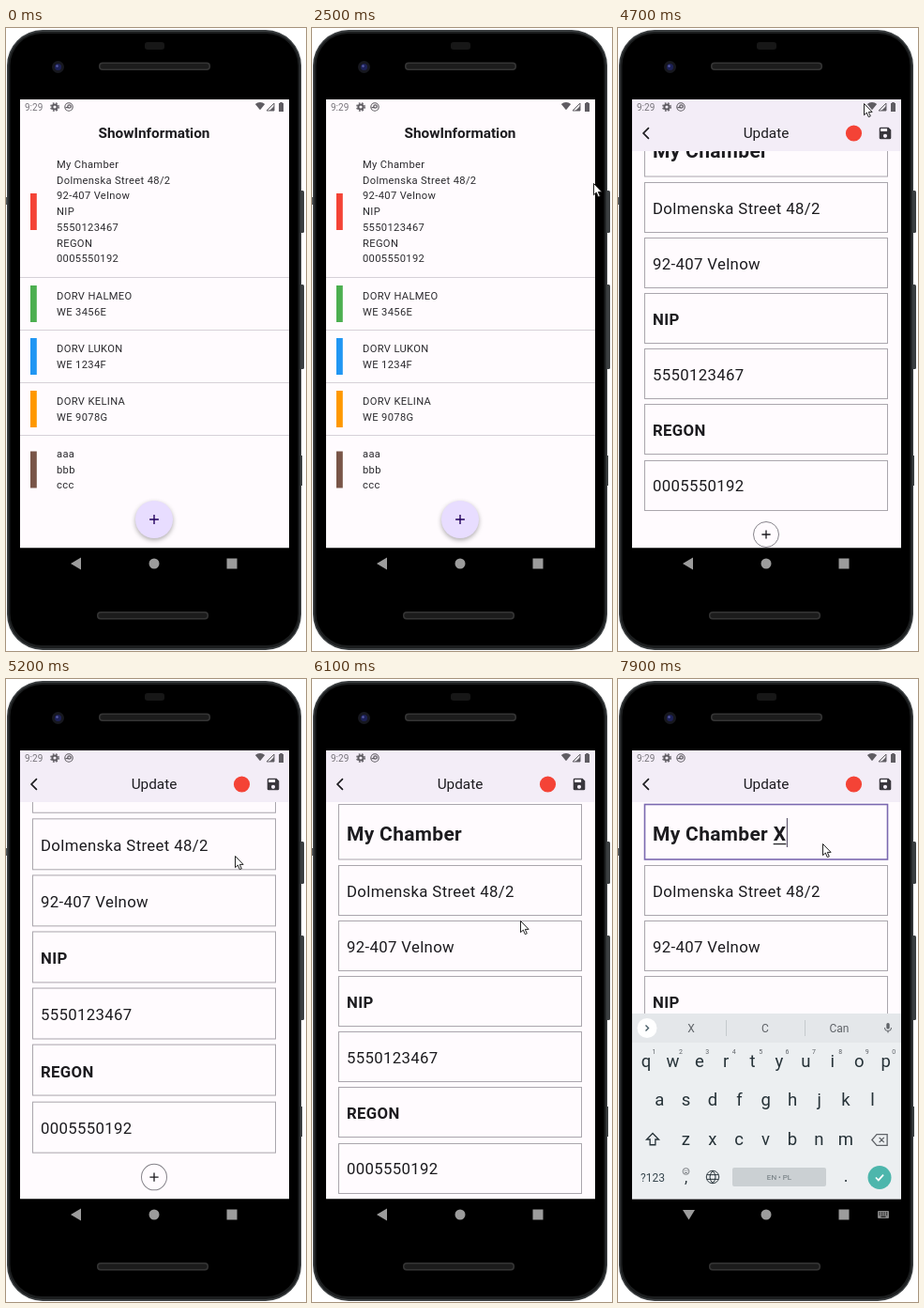
Write an HTML page with a canvas that moves like this. It is 320 px wide and 663 px high and loops after 8000 ms.

```html
<!DOCTYPE html>
<html lang="en">
<head>
<meta charset="utf-8">
<title>ShowInformation</title>
<style>
  html, body { margin: 0; width: 100%; height: 100%; overflow: hidden; background: #fff; }
  canvas { display: block; width: 320px; height: 663px; }
</style>
</head>
<body>
<canvas id="stage"></canvas>
<script>
const canvas = document.getElementById('stage');
const ctx = canvas.getContext('2d');
const LOOP = 8000, STEP = 100;
const DP = 0.698;
const SCREEN = { x: 15, y: 76, w: 287, h: 477.5 };
const BG = '#fffbfe', TINT = '#f3edf7', INK = '#1c1b1f', LILAC = '#e8ddff', DEEP = '#21005d';

const COMPANY = 'My Chamber';
const DETAILS = ['Dolmenska Street 48/2', '92-407 Velnow', 'NIP', '5550123467', 'REGON', '0005550192'];
const ROWS = [
  { lines: [COMPANY, ...DETAILS], y: 145, bar: 176, color: '#f44336' },
  { lines: ['DORV HALMEO', 'WE 3456E'], y: 285, bar: 274, color: '#4caf50' },
  { lines: ['DORV LUKON', 'WE 1234F'], y: 341, bar: 330, color: '#2196f3' },
  { lines: ['DORV KELINA', 'WE 9078G'], y: 397, bar: 386, color: '#ff9800' },
  { lines: ['aaa', 'bbb', 'ccc'], y: 453, bar: 450.5, color: '#795548' }
];

const ICONS = {
  plus: 'M19 13h-6v6h-2v-6H5v-2h6V5h2v6h6z',
  pencil: 'M3 17.25V21h3.75L17.81 9.94l-3.75-3.75zM20.71 7.04a1 1 0 0 0 0-1.41l-2.34-2.34a1 1 0 0 0-1.41 0l-1.83 1.83 3.75 3.75z',
  save: 'M17 3H5a2 2 0 0 0-2 2v14a2 2 0 0 0 2 2h14a2 2 0 0 0 2-2V7zM12 19a3 3 0 1 1 0-6 3 3 0 0 1 0 6zM15 9H5V5h10z',
  wifi: 'M12 21L0 6a18 18 0 0 1 24 0z',
  signal: 'M3 21h18V3z',
  mic: 'M12 14a3 3 0 0 0 3-3V5a3 3 0 0 0-6 0v6a3 3 0 0 0 3 3zM17.3 11a5.3 5.3 0 0 1-10.6 0H5a7 7 0 0 0 6 6.9V21h2v-3.1a7 7 0 0 0 6-6.9z',
  shift: 'M12 3L3 12h5v8h8v-8h5z',
  erase: 'M8 4h15v16H8l-7-8zM11.5 8.5l7 7M18.5 8.5l-7 7',
  globe: 'M12 2a10 10 0 1 0 .01 0zM12 2q-9 10 0 20q9-10 0-20M3 8.5h18M3 15.5h18',
  check: 'M5 12l5 5L19 7',
  chevron: 'M9 6l6 6-6 6',
  back: 'M17 2L7 12l10 10',
  arrow: 'M0.5 0.5v12.2l2.8-2.6 2 4.6 2-.9-2-4.4h3.8z'
};
for (const name in ICONS) ICONS[name] = new Path2D(ICONS[name]);

// Piecewise-linear value of [time, value] keys; values are numbers or points.
function track(keys, t) {
  if (t <= keys[0][0]) return keys[0][1];
  for (let i = 1; i < keys.length; i++) {
    const [t0, a] = keys[i - 1], [t1, b] = keys[i];
    if (t > t1) continue;
    const k = (t - t0) / (t1 - t0);
    return Array.isArray(a) ? a.map((v, j) => v + (b[j] - v) * k) : a + (b - a) * k;
  }
  return keys[keys.length - 1][1];
}

const POINTER_LEFT = [
  [100, [188, 39]], [300, [30, 190]], [500, [18, 300]], [700, [20, 460]], [900, [110, 554]],
  [1000, [148, 510]], [1200, [20, 440]], [1400, [17, 176]], [1600, [18, 350]], [1700, [19, 475]],
  [1800, [19, 475]], [1900, [22, 190]]
];
const POINTER_RIGHT = [
  [2500, [300, 165]], [2600, [272, 172]], [2800, [234, 180]], [3000, [234, 180]], [3400, [165, 184]],
  [3600, [180, 188]], [3800, [262, 192]], [4000, [270, 195]], [4500, [270, 195]], [4800, [258, 22]],
  [5000, [248, 215]], [5200, [244, 188]], [5300, [243, 178]], [5500, [239, 231]], [5600, [238.5, 231]],
  [5700, [238, 233]], [6000, [230, 273]], [6300, [205, 225]], [6600, [180, 163]], [6900, [180, 163]],
  [7500, [212, 170]], [7700, [218, 175]]
];
const SWIPE = [[3000, 0], [3100, -10], [3300, -45], [3400, -57.4]];
const SCROLL = [[4500, 0], [4600, 14], [4700, 34], [4800, 42.5], [5600, 42.5], [5700, 40], [5900, 13], [6000, 0]];
const STRETCH = [[4700, 1], [4800, 1.03], [5000, 1], [5200, 1.018], [5300, 1.022], [5500, 1]];
const KEYBOARD = [[6900, 0], [7000, 0.55], [7100, 0.88], [7200, 1]];

function box(x, y, w, h, color) { ctx.fillStyle = color; ctx.fillRect(x, y, w, h); }
function pill(x, y, w, h, r, color) {
  ctx.fillStyle = color;
  ctx.beginPath(); ctx.roundRect(x, y, w, h, r); ctx.fill();
}
function disc(x, y, r, color) {
  ctx.fillStyle = color;
  ctx.beginPath(); ctx.arc(x, y, r, 0, 7); ctx.fill();
}
function ring(x, y, r, color, width = 1) {
  ctx.strokeStyle = color; ctx.lineWidth = width;
  ctx.beginPath(); ctx.arc(x, y, r, 0, 7); ctx.stroke();
}
function poly(points, color) {
  ctx.fillStyle = color;
  ctx.beginPath(); points.forEach(p => ctx.lineTo(...p)); ctx.fill();
}
// y is the middle of the capitals.
function text(str, x, y, size, { color = INK, weight = 400, align = 'left', spacing = 0 } = {}) {
  ctx.font = `${weight} ${size}px Roboto, sans-serif`;
  ctx.letterSpacing = spacing + 'px';
  ctx.textAlign = align;
  ctx.fillStyle = color;
  ctx.fillText(str, x, y + size * 0.355);
  return ctx.measureText(str).width;
}
function icon(name, cx, cy, color, scale = DP, stroke = 0) {
  ctx.save();
  ctx.translate(cx - 12 * scale, cy - 12 * scale);
  ctx.scale(scale, scale);
  ctx.fillStyle = ctx.strokeStyle = color;
  ctx.lineWidth = stroke / scale;
  stroke ? ctx.stroke(ICONS[name]) : ctx.fill(ICONS[name], 'evenodd');
  ctx.restore();
}
function clipped(x, y, w, h, draw) {
  ctx.save();
  ctx.beginPath(); ctx.rect(x, y, w, h); ctx.clip();
  draw();
  ctx.restore();
}

function phone() {
  box(0, 0, 320, 663, '#fff');
  box(0, 180, 3, 8, '#55595b');
  pill(313, 173, 5, 45, 1.5, '#3a3e40');
  pill(313, 273, 5, 90, 1.5, '#3a3e40');
  box(313, 455, 3, 32, '#3a3e40');
  pill(1, 2, 314, 660, 38, '#3a3e40');
  pill(2.5, 4, 311, 656, 36, '#1b1d1e');
  pill(4.5, 6, 307, 651, 34, '#000');
  pill(148, 15, 21, 8, 3, '#171717');
  for (const [x, y] of [[99, 36.5], [97, 621]]) {
    pill(x, y, 119, 8.5, 4, '#353535');
    pill(x + 1.5, y + 1.5, 116, 5.5, 3, '#1c1c1c');
  }
  disc(55.5, 41.5, 6.5, '#17181f');
  disc(55.5, 41.5, 3.5, '#1d2157');
  disc(54.5, 40.5, 1.2, '#5a5fa8');
}

function navBar(typing) {
  const grey = '#9c9c9c';
  poly(typing ? [[69, 565], [82, 565], [75.5, 575.5]] : [[69, 570], [80, 563.5], [80, 576.5]], grey);
  disc(158, 570, 5.5, grey);
  box(235.5, 564.5, 11, 11, grey);
  if (!typing) return;
  pill(277, 566, 12, 8, 1, '#858585');
  for (let i = 0; i < 8; i++) box(278.5 + (i % 4) * 2.5, 567.5 + (i >> 2) * 2, 1.2, 1, '#000');
  box(280.5, 571.7, 5, 1, '#000');
}

function statusBar() {
  const grey = '#5f5c62';
  text('9:29', 20, 84, 10, { color: '#77747a' });
  ring(52, 84, 2.6, grey, 2);
  ctx.setLineDash([1.7, 1.7]);
  ring(52, 84, 4.2, grey, 1.4);
  ctx.setLineDash([]);
  ring(67, 84, 4.2, grey, 1.1);
  ring(67.5, 83.5, 1.7, grey, 1.3);
  box(63.5, 84, 3, 1.2, grey);
  icon('wifi', 271, 83.5, grey, 0.43);
  icon('signal', 282, 84, grey, 0.44, 1);
  poly([[281, 88], [286, 88], [286, 83]], grey);
  box(291, 80, 5, 9, grey);
  box(292.2, 79, 2.6, 1, grey);
}

function listRow(row) {
  box(26, row.bar, 6.8, 39, row.color);
  row.lines.forEach((line, i) => text(line, 54, row.y + i * 16.75, 16 * DP, { color: '#2b2a2e', spacing: 0.35 }));
}

function listPage(t) {
  const { x, y, w, h } = SCREEN;
  box(x, y, w, h, BG);
  text('ShowInformation', 158, 112, 22 * DP, { weight: 700, align: 'center' });
  const swipe = track(SWIPE, t);
  ctx.save();
  ctx.translate(swipe, 0);
  listRow(ROWS[0]);
  box(302, 131, 58, 129, LILAC);
  icon('pencil', 330.7, 195.5, DEEP, 0.6);
  ctx.restore();
  ROWS.slice(1).forEach((row, i) => {
    box(x, 265 + i * 56, w, 1, '#d6d1d8');
    listRow(row);
  });
  ctx.save();
  ctx.shadowColor = 'rgba(0,0,0,.32)';
  ctx.shadowBlur = 5;
  ctx.shadowOffsetY = 2;
  disc(158, 523, 20, LILAC);
  ctx.restore();
  icon('plus', 158, 523, DEEP);
}

function field(y, h, focused) {
  ctx.strokeStyle = focused ? '#7b68b0' : '#aaa6ad';
  ctx.lineWidth = focused ? 1.6 : 1;
  ctx.strokeRect(28.5, y + 0.5, 259, h - 1);
}

function formFields(t) {
  const focused = t >= 6800, typed = t >= 7800;
  const title = COMPANY + (t >= 7600 ? ' ' : '');
  const style = { weight: 700, spacing: 0.35 };
  field(133, 59.5, focused);
  let end = 37 + text(title, 37, 165, 30 * DP, style);
  if (typed) {
    const w = text('X', end, 165, 30 * DP, style);
    box(end, 175, w, 1.2, INK);
    end += w;
  }
  const blinkStart = t >= 7600 ? 7600 : 6800;
  if (focused && (typed || (t - blinkStart) % 1000 < 500)) box(end + 0.5, 148, 1.2, 31, '#625b71');
  DETAILS.forEach((line, i) => {
    const y = 198 + i * 59.1;
    field(Math.round(y), 54, false);
    text(line, 37, y + 28, 24 * DP, { weight: /^[A-Z]+$/.test(line) ? 700 : 400, spacing: 0.35 });
  });
  ring(158, 573, 13.5, '#86838a');
  icon('plus', 158, 573, INK, 0.66);
}

function formPage(t) {
  const { x, y, w, h } = SCREEN;
  box(x, y, w, h, BG);
  clipped(x, 131, w, 422.5, () => {
    const s = track(STRETCH, t);
    ctx.translate(0, 553 * (1 - s));
    ctx.scale(1, s);
    ctx.translate(0, -track(SCROLL, t));
    formFields(t);
  });
  box(x, y, w, 55, t >= 4600 ? TINT : BG);
  icon('back', 30, 112, INK, 0.58, 1.7);
  text('Update', 158, 112, 22 * DP, { align: 'center' });
  disc(251.5, 112, 8.6, '#f44336');
  icon('save', 285, 112, '#39373d');
}

function keyboard(t) {
  const upper = t >= 7600 && t < 7800;
  const grey = '#5f6368', dark = '#263238';
  const mid = (color = grey) => ({ color, align: 'center' });
  box(15, 356, 287, 198, '#eceff1');
  box(15, 356, 287, 31, '#e4e7ea');
  disc(31, 371.5, 10.5, '#fff');
  icon('chevron', 31, 371.5, '#455a64', 0.5, 1.4);
  icon('mic', 288, 371.5, grey, 0.56);
  if (t >= 7800) {
    ['X', 'C', 'Can'].forEach((word, i) => text(word, 78 + i * 79, 372, 12, mid()));
    box(115, 363, 1, 17, '#c5cacd');
    box(199, 363, 1, 17, '#c5cacd');
  }
  const letters = [['qwertyuiop', 30, 413], ['asdfghjkl', 44.2, 454.5], ['zxcvbnm', 72.4, 496]];
  for (const [row, x0, base] of letters)
    [...row].forEach((ch, i) => {
      const x = x0 + i * 28.4;
      text(upper ? ch.toUpperCase() : ch, x, base - 6.6, 18.5, mid(dark));
      if (row.length === 10) text(String((i + 1) % 10), x + 8.5, 397, 7, mid());
    });
  icon('shift', 37, 490, dark, 0.72, 1.3);
  if (upper) icon('shift', 37, 490, dark, 0.72);
  icon('erase', 279, 490.5, grey, 0.74, 1.3);
  text('?123', 37, 530.5, 12, mid('#37474f'));
  ring(72.5, 524, 3.4, grey, 0.8);
  box(71, 522.8, 1, 1, grey);
  box(73.2, 522.8, 1, 1, grey);
  box(71, 525, 3, 0.8, grey);
  text(',', 72.5, 530, 16, mid(dark));
  icon('globe', 101, 530, dark, 0.67, 1);
  pill(122, 520, 100, 20, 2, '#cbd0d3');
  text('EN • PL', 172, 530.5, 8, mid('#6b757a'));
  text('.', 243, 529, 18, mid(dark));
  disc(279, 530.5, 12.5, '#4db6ac');
  icon('check', 279, 530.5, '#fff', 0.58, 1.7);
}

function screen(t) {
  const { x, y, w, h } = SCREEN;
  clipped(x, y, w, h, () => {
    if (t < 4500) listPage(t);
    if (t > 4200) {
      const p = Math.min(1, (t - 4200) / 300);
      const scale = 1 - 0.15 * (1 - p) ** 3;
      ctx.save();
      ctx.globalAlpha = Math.min(1, p * 3);
      ctx.translate(158.5, 314.5);
      ctx.scale(scale, scale);
      ctx.translate(-158.5, -314.5);
      formPage(t);
      ctx.restore();
    }
    statusBar();
    const shown = track(KEYBOARD, t);
    if (shown > 0) {
      ctx.translate(0, (1 - shown) * 198);
      keyboard(t);
    }
  });
}

function pointer(t) {
  if (t < 100 || (t >= 2000 && t < 2500)) return;
  const [x, y] = track(t < 2000 ? POINTER_LEFT : POINTER_RIGHT, t);
  ctx.save();
  ctx.translate(Math.round(x), Math.round(y));
  ctx.fillStyle = '#fff';
  ctx.strokeStyle = '#222';
  ctx.lineWidth = 1;
  ctx.fill(ICONS.arrow);
  ctx.stroke(ICONS.arrow);
  ctx.restore();
}

function render(now) {
  const t = Math.floor((now % LOOP) / STEP) * STEP;
  const ratio = window.devicePixelRatio || 1;
  const width = Math.round(320 * ratio), height = Math.round(663 * ratio);
  if (canvas.width !== width || canvas.height !== height) {
    canvas.width = width;
    canvas.height = height;
  }
  ctx.setTransform(ratio, 0, 0, ratio, 0, 0);
  phone();
  navBar(t >= 7000);
  screen(t);
  pointer(t);
}

const start = performance.now();
function loop() {
  render(performance.now() - start);
  requestAnimationFrame(loop);
}
loop();
</script>
</body>
</html>
```
